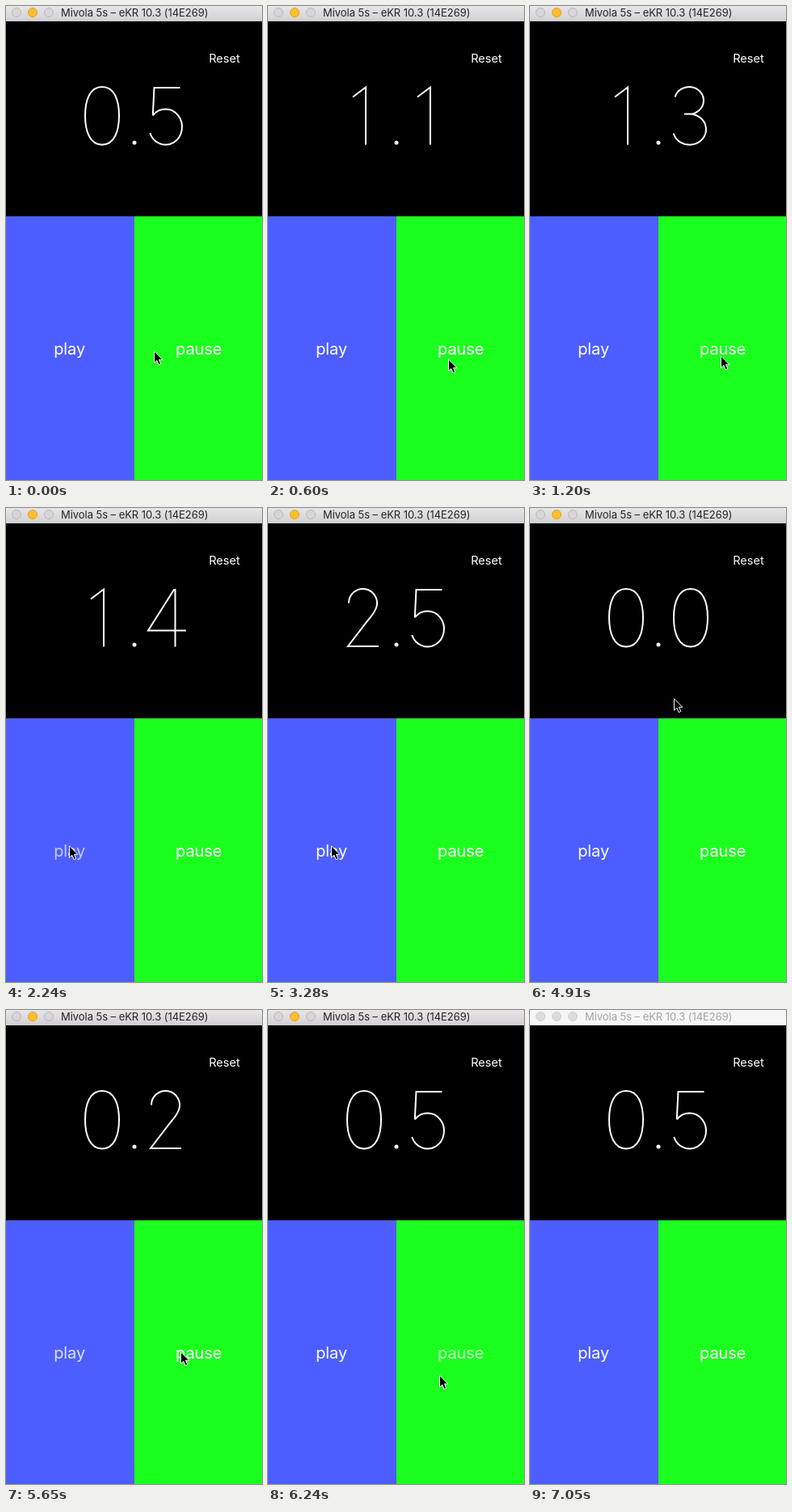
An HTML page for the animation above (7150 ms loop, 317 px wide and 586 px high).

```html
<!DOCTYPE html>
<html lang="en">
<head>
<meta charset="utf-8">
<title>Stopwatch</title>
<style>
  html, body { margin: 0; width: 100%; height: 100%; overflow: hidden; background: #000; }
  svg { display: block; width: 317px; height: 586px; font-family: Inter, Roboto, "Open Sans", sans-serif; }
  #title { font-size: 13px; letter-spacing: -.05px; fill: #262426; }
  .dot { fill: #d7d5d7; stroke: #b9b7b9; }
  .dot.min { fill: #ffbe2f; stroke: #e0a024; }
  .label { font-size: 20px; letter-spacing: -.1px; fill: #fff; }
  #reset { font-size: 14.7px; }
  #digits { fill: none; stroke: #fff; stroke-width: 2; }
  .idle #bar { fill: #f6f6f6; }
  .idle #edge { fill: #e4e4e4; }
  .idle #title { fill: #a4a4a4; }
  .idle .dot { fill: #dcdcdc; stroke: #cfcfcf; }
</style>
</head>
<body>
<svg id="stage" viewBox="0 0 317 586">
  <defs>
    <linearGradient id="chrome" x2="0" y2="1">
      <stop stop-color="#e7e5e7"/>
      <stop offset="1" stop-color="#d2d0d2"/>
    </linearGradient>
  </defs>
  <rect id="bar" width="317" height="19" fill="url(#chrome)"/>
  <rect id="edge" y="18" width="317" height="1" fill="#c8c6c8"/>
  <circle class="dot" cx="13" cy="8" r="5.5"/>
  <circle class="dot min" cx="33" cy="8" r="5.5"/>
  <circle class="dot" cx="53" cy="8" r="5.5"/>
  <text id="title" x="68" y="13">Mivola 5s – eKR 10.3 (14E269)</text>

  <rect y="19" width="317" height="241"/>
  <rect y="260" width="159" height="326" fill="#4c5eff"/>
  <rect x="159" y="260" width="158" height="326" fill="#1bff1e"/>
  <g id="digits">
    <path id="ones" transform="translate(97)"/>
    <path id="tenths" transform="translate(177)"/>
  </g>
  <circle cx="159" cy="169" r="2.5" fill="#fff"/>
  <text id="reset" class="label" x="251.2" y="70">Reset</text>
  <text id="play" class="label" x="59.2" y="431">play</text>
  <text id="pause" class="label" x="210.1" y="431">pause</text>
  <path id="cursor" d="M.5 .8V15.2L3.8 12.2L6.2 17.6L8.8 16.5L6.5 11.2H10.8Z" stroke="#fff"/>
</svg>
<script>
const LOOP = 7150, STEP = 148.6, LEAVE = 6530, IDLE = 7050;
const $ = id => document.getElementById(id);

// Elliptical strokes; angles in degrees, clockwise from the right
function arc(cx, cy, rx, ry, from, to) {
  const at = deg => {
    const a = deg * Math.PI / 180;
    return `${cx + rx * Math.cos(a)} ${cy + ry * Math.sin(a)}`;
  };
  return `M${at(from)}A${rx} ${ry} 0 ${to - from > 180 ? 1 : 0} 1 ${at(to)}`;
}
const ring = (...oval) => arc(...oval, 0, 180) + arc(...oval, 180, 360);

const GLYPHS = [
  "M22 100C37 100 43 116 43 135.5S37 171.5 22 171.5 1 155 1 135.5 7 100 22 100Z",
  "M8 112.5L24 100.5V171.5",
  arc(20.5, 117.5, 17.5, 17.5, 180, 380) + "Q34.5 130 27 138.5L2 171H40",
  arc(20, 116.8, 18, 16.8, -165, 90) + arc(20.5, 152.5, 20.5, 19, -90, 165) + "M14 133.5H21",
  "M32.5 171.5V101H31L-1 151.5H46",
  "M38.5 101H6.5L4.8 135.4" + arc(20.5, 149.5, 20.5, 22, -140, 160),
  ring(22, 150.5, 20, 21) + "M4.7 140L27.5 100",
  "M3 101H41L14 171.5",
  ring(22, 116.5, 16.5, 16.5) + ring(22, 152.3, 19.5, 19.2),
  ring(22, 121, 20, 21) + "M39.3 131.5L16.5 171.5"
];

const PRESSES = [
  [800, "pause"], [2090, "play"], [3700, "pause"],
  [4320, "reset"], [5400, "play"], [5910, "pause"]
];

// Cursor stops: [time, x, y]
const STOPS = [
  [0, 183, 426], [300, 201, 442], [800, 236, 432], [1200, 236, 432],
  [1940, 78, 417], [3280, 78, 417], [3700, 217, 422], [4020, 266, 69],
  [4620, 266, 69], [5210, 79, 420], [5400, 79, 420], [5650, 216, 422],
  [5950, 216, 422], [6390, 198, 539]
];

// Replay the button presses up to t; the watch is already running at 0
function elapsed(t) {
  let total = 530, since = 0, running = true;
  for (const [time, button] of PRESSES) {
    if (time > t) break;
    if (running) total += time - since;
    if (button === "reset") total = 0;
    running = button === "play";
    since = time;
  }
  return running ? total + t - since : total;
}

// A pressed label dims, then recovers
function opacity(button, t) {
  const press = PRESSES.findLast(([time, name]) => name === button && time <= t);
  return press ? 1 - .62 * Math.exp((press[0] - t) / 200) : 1;
}

function cursorAt(t) {
  const i = STOPS.findIndex(s => s[0] > t);
  if (i < 0) return STOPS.at(-1).slice(1);
  const [t0, x0, y0] = STOPS[i - 1], [t1, x1, y1] = STOPS[i];
  const u = (t - t0) / (t1 - t0), ease = u * u * (3 - 2 * u);
  return [x0 + (x1 - x0) * ease, y0 + (y1 - y0) * ease].map(Math.round);
}

function draw(time) {
  const t = Math.floor(time / STEP) * STEP;
  const tenths = Math.floor(elapsed(t) / 100);
  $("ones").setAttribute("d", GLYPHS[Math.floor(tenths / 10)]);
  $("tenths").setAttribute("d", GLYPHS[tenths % 10]);

  for (const id of ["play", "pause", "reset"]) $(id).setAttribute("opacity", opacity(id, t));

  $("cursor").setAttribute("transform", `translate(${cursorAt(t)})`);
  $("cursor").setAttribute("visibility", t < LEAVE ? "visible" : "hidden");
  $("stage").classList.toggle("idle", time >= IDLE);
}

const origin = performance.now();
function frame() {
  draw((performance.now() - origin) % LOOP);
  requestAnimationFrame(frame);
}
frame();
</script>
</body>
</html>
```
